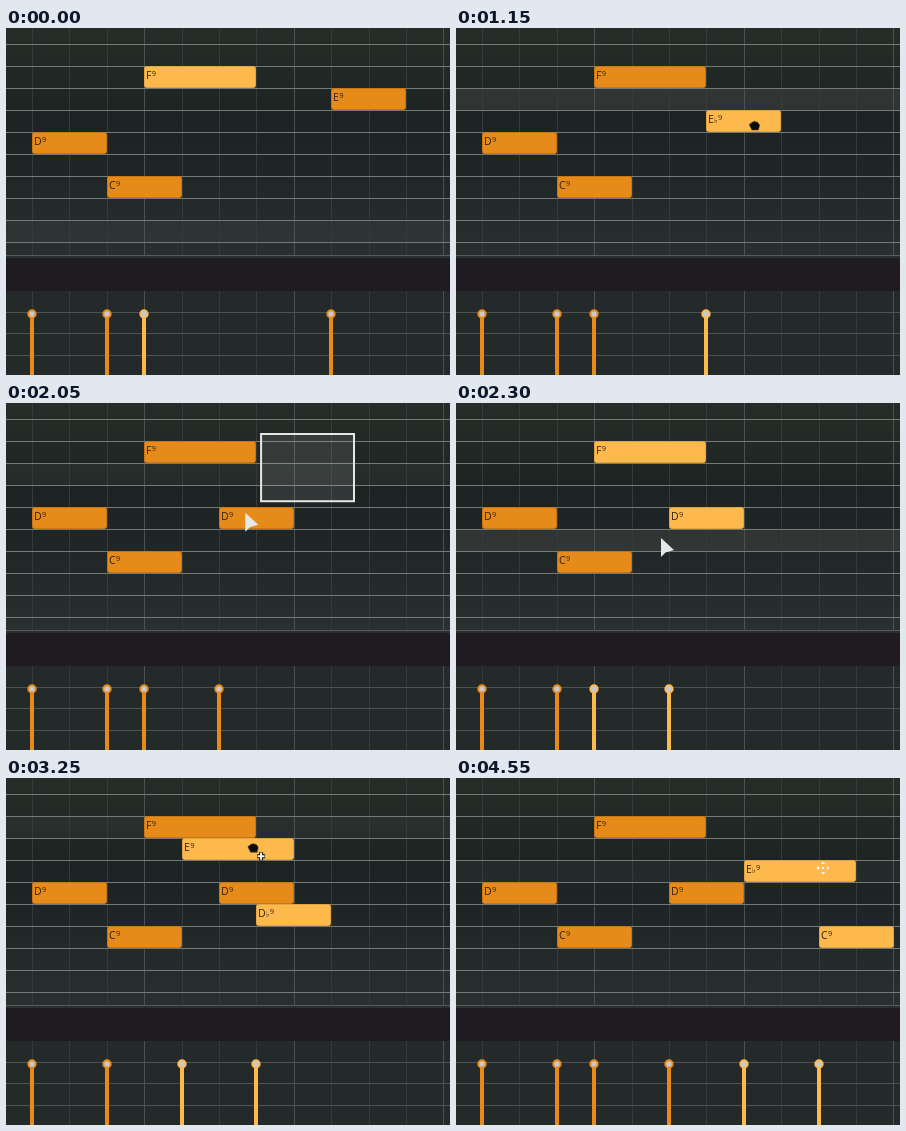
Write an HTML page that moves like this. It is 444 px wide and 347 px high and loops after 5350 ms.

```html
<!DOCTYPE html>
<html lang="en">
<head>
<meta charset="utf-8">
<title>Piano roll</title>
<style>
html, body { margin: 0; width: 100%; height: 100%; overflow: hidden; background: #1f1b20; }
svg { display: block; width: 444px; height: 347px; }
.note, .stem { --c: #e68a19; --edge: #c97615; }
.hover { --c: #fd9f30; --edge: #e08a24; }
.on { --c: #feb94d; --edge: #e5a443; }
.note rect { fill: var(--c); stroke: var(--edge); }
.note text { font: 10.5px "Open Sans", "Noto Sans", sans-serif; fill: #33240f; }
.note .sup { font-size: 7.5px; }
.stem path { stroke: var(--c); stroke-width: 4; }
.stem circle { fill: #c6cad0; stroke: var(--c); stroke-width: 2; }
</style>
</head>
<body>
<svg id="stage" viewBox="0 0 444 347">
  <defs>
    <linearGradient id="bg" x2="0" y2="1">
      <stop offset="0" stop-color="#262c27"/>
      <stop offset=".2" stop-color="#222825"/>
      <stop offset=".38" stop-color="#1d2322"/>
      <stop offset=".62" stop-color="#202625"/>
      <stop offset="1" stop-color="#2a2f2f"/>
    </linearGradient>
  </defs>
  <rect width="444" height="230" fill="url(#bg)"/>
  <rect y="230" width="444" height="33" fill="#1f1b20"/>
  <rect y="263" width="444" height="84" fill="#242a2a"/>
  <rect id="row" width="444" height="22" fill="#fff"/>
  <g id="grid"></g>
  <g id="stems"></g>
  <g id="notes"></g>
  <rect id="marquee" fill="#fff" fill-opacity=".09" stroke="#e4e7e4" stroke-width="2"/>
  <g id="cursor">
    <path id="arrow" d="M0 0V19L4.5 14.5L13 12Z" fill="#e6e8e8"/>
    <path id="move" fill="#fff" d="M0-6.5l2 2.6h-4zM0 6.5l2-2.6h-4zM-6.5 0l2.6-2v4zM6.5 0l-2.6-2v4zM-1-1h2v2h-2z"/>
    <g id="fist">
      <path d="M-5-1Q-5-3-3-2.5Q-3-4.5-1-4Q0-5.5 1.5-4Q3.5-4.5 4-2.5Q5.5-2 5 0L4 4H-2.5Z" fill="#0c0c0c" stroke="#4a4038" stroke-width=".6"/>
      <path id="plus" d="M8 4v8M4 8h8" stroke="#0c0c0c" stroke-width="4"/>
      <path id="plusIn" d="M8 4.5v7M4.5 8h7" stroke="#f4f4f4" stroke-width="2"/>
    </g>
  </g>
</svg>
<script>
const LOOP = 5350, STEP = 50, COL = 37.4, LEFT = 26, ROW = 22, TOP = 16;
const PRESS = 850, DROP = 1450, SWEEP = 1800, SWEPT = 2300, COPY = 3050, COPIED = 4300;
const NAMES = ['F♯', 'F', 'E', 'E♭', 'D', 'D♭', 'C', 'B'];
const $ = id => document.getElementById(id);

function add(parent, tag, attrs = {}) {
  const el = document.createElementNS('http://www.w3.org/2000/svg', tag);
  set(el, attrs);
  parent.appendChild(el);
  return el;
}
function set(el, attrs) {
  for (const k in attrs) el.setAttribute(k, attrs[k]);
}
const show = (el, on) => set(el, { visibility: on ? 'visible' : 'hidden' });
const colX = c => Math.round(LEFT + c * COL);
const rowAt = y => Math.floor((y - TOP) / ROW);

function drawGrid() {
  const grid = $('grid');
  const line = (x, y, width, height, fill) => add(grid, 'rect', { x, y, width, height, fill });
  for (let c = 0; c < 12; c++) {
    const fill = c % 4 === 3 ? '#4a5150' : '#343b3a';
    line(colX(c), 0, 1, 228, fill);
    line(colX(c), 263, 1, 84, fill);
  }
  for (let y = TOP; y <= 214; y += ROW) line(0, y, 444, 1, '#737a77');
  line(0, 227, 444, 1, '#565c5a');
  for (const y of [284, 305, 327]) line(0, y, 444, 1, '#4b5251');
}

class Note {
  constructor(col, row, len) {
    Object.assign(this, { col, row });
    this.stem = add($('stems'), 'g');
    add(this.stem, 'path', { d: 'M0 286V347' });
    add(this.stem, 'circle', { cy: 286, r: 3.7 });
    this.body = add($('notes'), 'g');
    add(this.body, 'rect', { x: .5, y: .5, width: Math.round(len * COL) - 1, height: 21, rx: 2 });
    const text = add(this.body, 'text', { x: 2, y: 13 });
    this.name = add(text, 'tspan');
    this.flat = add(text, 'tspan', { 'font-size': 8 });
    add(text, 'tspan', { class: 'sup', dy: -3, dx: .3 }).textContent = '9';
  }
  draw(state, dc = 0, dr = 0, visible = true, stem = visible) {
    const x = colX(this.col + dc), r = this.row + dr, name = NAMES[r];
    set(this.body, { class: 'note ' + state, transform: `translate(${x} ${TOP + r * ROW})` });
    set(this.stem, { class: 'stem ' + state, transform: `translate(${x} 0)` });
    this.name.textContent = name[0];
    this.flat.textContent = name.slice(1);
    show(this.body, visible);
    show(this.stem, stem);
  }
}

const smooth = u => u * u * (3 - 2 * u);
const easeOut = u => 1 - (1 - u) ** 2;
// time, x, y, easing towards this point
const path = [
  [50, 460, 203], [500, 362, 56], [700, 362, 73], [PRESS, 362, 73],
  [1400, 250, 117], [DROP, 250, 117], [1650, 343, 49], [1750, 348, 30],
  [SWEEP, 348, 30], [2290, 205, 135, easeOut], [SWEPT, 205, 135], [2550, 213, 38],
  [2800, 213, 38], [2900, 202, 57], [COPY, 202, 57], [3600, 352, 101],
  [COPIED, 352, 101], [4550, 367, 90]
];

function pointer(t) {
  const i = path.findIndex(p => p[0] > t);
  if (i <= 0) return (i ? path[path.length - 1] : path[0]).slice(1, 3);
  const a = path[i - 1], b = path[i];
  const k = (b[3] || smooth)((t - a[0]) / (b[0] - a[0]));
  return [a[1] + (b[1] - a[1]) * k, a[2] + (b[2] - a[2]) * k];
}

// Snapped offset of a drag, in columns and rows
function drag(t, from, to) {
  const [x0, y0] = pointer(from), [x, y] = pointer(Math.min(Math.max(t, from), to));
  return [Math.round((x - x0) / COL), rowAt(y) - rowAt(y0)];
}

function cursorKind(t, x, y, hover) {
  if (t < PRESS) return hover ? 'move' : 'arrow';
  if (t < DROP) return 'fist';
  if (t < 1700) return 'move';
  if (t < SWEPT) return 'arrow';
  if (t < COPY) return y < 62 ? 'move' : 'arrow';
  return t < COPIED ? 'fist' : 'move';
}

drawGrid();
const d1 = new Note(0, 4, 2), c1 = new Note(2, 6, 2), f = new Note(3, 1, 3), e = new Note(8, 2, 2);
const fCopy = new Note(3, 1, 3), eCopy = new Note(5, 4, 2);

function render(t) {
  const [x, y] = pointer(t);
  const hover = t < PRESS && x >= 325 && x <= 400 && y >= 60 && y < 82;
  const [mx, my] = pointer(t - 50);
  const sweeping = t >= SWEEP && t < SWEPT;
  const picked = t >= SWEEP && t < COPY;
  const copying = t >= COPY && t < COPIED;
  const copied = t >= COPY;
  const on = flag => flag ? 'on' : '';

  d1.draw('');
  c1.draw('');
  f.draw(on(t < PRESS || picked && (t >= SWEPT || mx < 250)), 0, 0, true, !copying);
  const eOn = t >= PRESS && t < SWEEP || picked && (t >= SWEPT || my > 104);
  e.draw(hover ? 'hover' : on(eOn), ...drag(t, PRESS, DROP), true, !copying);
  const shift = drag(t, COPY, COPIED);
  fCopy.draw('on', ...shift, copied);
  eCopy.draw('on', ...shift, copied);

  // The row light trails the pointer
  const bright = t > 50 && t < 1700 || t >= SWEPT && t < COPY;
  set($('row'), {
    y: TOP + rowAt(pointer(t - 150)[1]) * ROW,
    'fill-opacity': bright ? .075 : .03
  });

  show($('marquee'), sweeping);
  if (sweeping) {
    const [ax, ay] = pointer(SWEEP);
    set($('marquee'), { x: mx, y: ay + 1, width: Math.max(0, ax - mx), height: Math.max(0, my - ay - 1) });
  }

  const kind = cursorKind(t, x, y, hover);
  for (const id of ['arrow', 'move', 'fist']) show($(id), id === kind);
  for (const id of ['plus', 'plusIn']) show($(id), copying);
  set($('cursor'), { transform: `translate(${x} ${y})` });
}

const start = performance.now();
function tick() {
  const t = (performance.now() - start) % LOOP;
  render(Math.floor(t / STEP) * STEP);
  requestAnimationFrame(tick);
}
tick();
</script>
</body>
</html>
```
